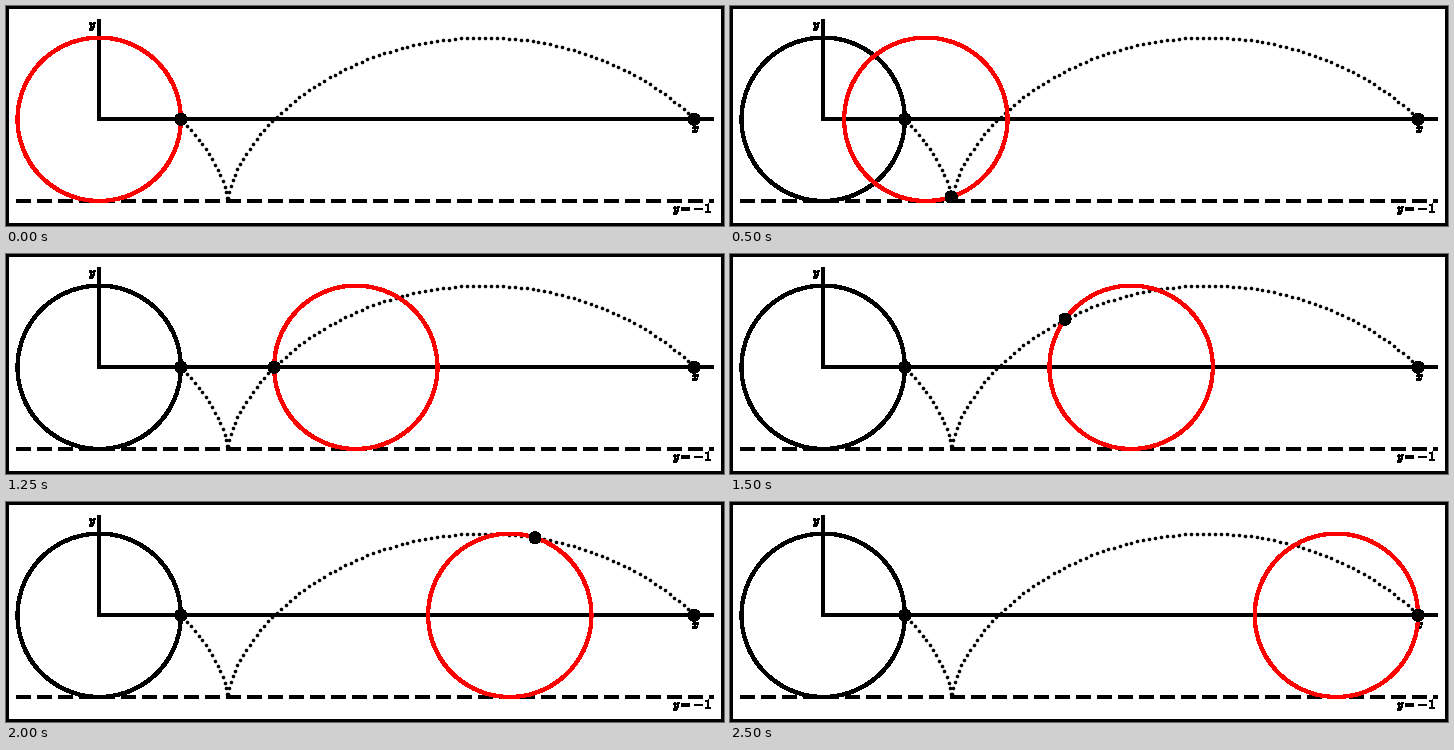
Recreate the animation shown at these times as a matplotlib script. Size 718 by 220 pixels, loop 2.75 s.

```python
import numpy as np
import matplotlib.pyplot as plt
from matplotlib.animation import FuncAnimation
from matplotlib.patches import Circle, Rectangle
from matplotlib.patheffects import Normal, Stroke

W, H, DPI = 718, 220, 100
PX = 72 / DPI                 # one pixel in points
X0, Y0 = 93.2, 113.3          # centre of the resting wheel
STEPS = 10
R = 513.2 / (2 * np.pi)       # one full turn covers 513.2 px
LINE, RING, DOT = 3.6, 3.2, 6
DASH, DOT_GAP = 10.8, 6

fig = plt.figure(figsize=(W / DPI, H / DPI), dpi=DPI, facecolor="white")
plt.rcParams["mathtext.fontset"] = "cm"
ax = fig.add_axes([0, 0, 1, 1])
ax.set_xlim(0, W)
ax.set_ylim(H, 0)
ax.axis("off")


def rim_point(turn):
    """Position of the marked rim point after rolling by an angle."""
    return X0 + R * turn + R * np.cos(turn), Y0 + R * np.sin(turn)


def line(x, y, **style):
    ax.plot(x, y, color="black", lw=LINE * PX, antialiased=False,
            solid_capstyle="round", dash_capstyle="round", **style)


def ring(color, z):
    return ax.add_patch(Circle((X0, Y0), R, fill=False, ec=color,
                               lw=RING * PX, antialiased=False, zorder=z))


def dot(pos):
    return ax.add_patch(Circle(pos, DOT, fc="black", ec="none",
                               antialiased=False, zorder=6))


def label(x, y, text):
    bold = [Stroke(linewidth=0.5 * PX, foreground="black"), Normal()]
    ax.text(x, y, text, fontsize=11.6 * PX, ha="center", va="baseline",
            zorder=3, antialiased=False, path_effects=bold)


# frame, axes and ground
ax.add_patch(Rectangle((0, 0), W, H, fill=False, ec="black", lw=6 * PX,
                       joinstyle="miter", clip_on=False))
right = X0 + 7.5 * R
line([X0, X0, right], [Y0 - 1.2 * R, Y0, Y0])
line([X0 - R, right], [Y0 + R, Y0 + R],
     linestyle=(0, (DASH / LINE, DASH / LINE)))

# dots evenly spaced along the path of the rim point
turn = np.linspace(0, 2 * np.pi, 4000)
px, py = rim_point(turn)
length = np.concatenate([[0], np.cumsum(np.hypot(np.diff(px), np.diff(py)))])
even = np.interp(np.arange(DOT_GAP / 2, length[-1], DOT_GAP), length, turn)
ax.plot(*rim_point(even), "o", color="black", ms=LINE * PX, mew=0,
        antialiased=False, zorder=2)

label(87, 22, "$y$")
label(690, 126, "$x$")
label(686.5, 206, "$y=-1$")

ring("black", 2)
wheel = ring("red", 5)
dot(rim_point(0))
dot(rim_point(2 * np.pi))
marker = dot(rim_point(0))


def draw(k):
    angle = 2 * np.pi * k / STEPS
    wheel.center = (X0 + R * angle, Y0)
    marker.center = rim_point(angle)
    return wheel, marker


anim = FuncAnimation(fig, draw, frames=STEPS + 1, interval=250,
                     repeat=True, repeat_delay=0, blit=False)
plt.show()
```
